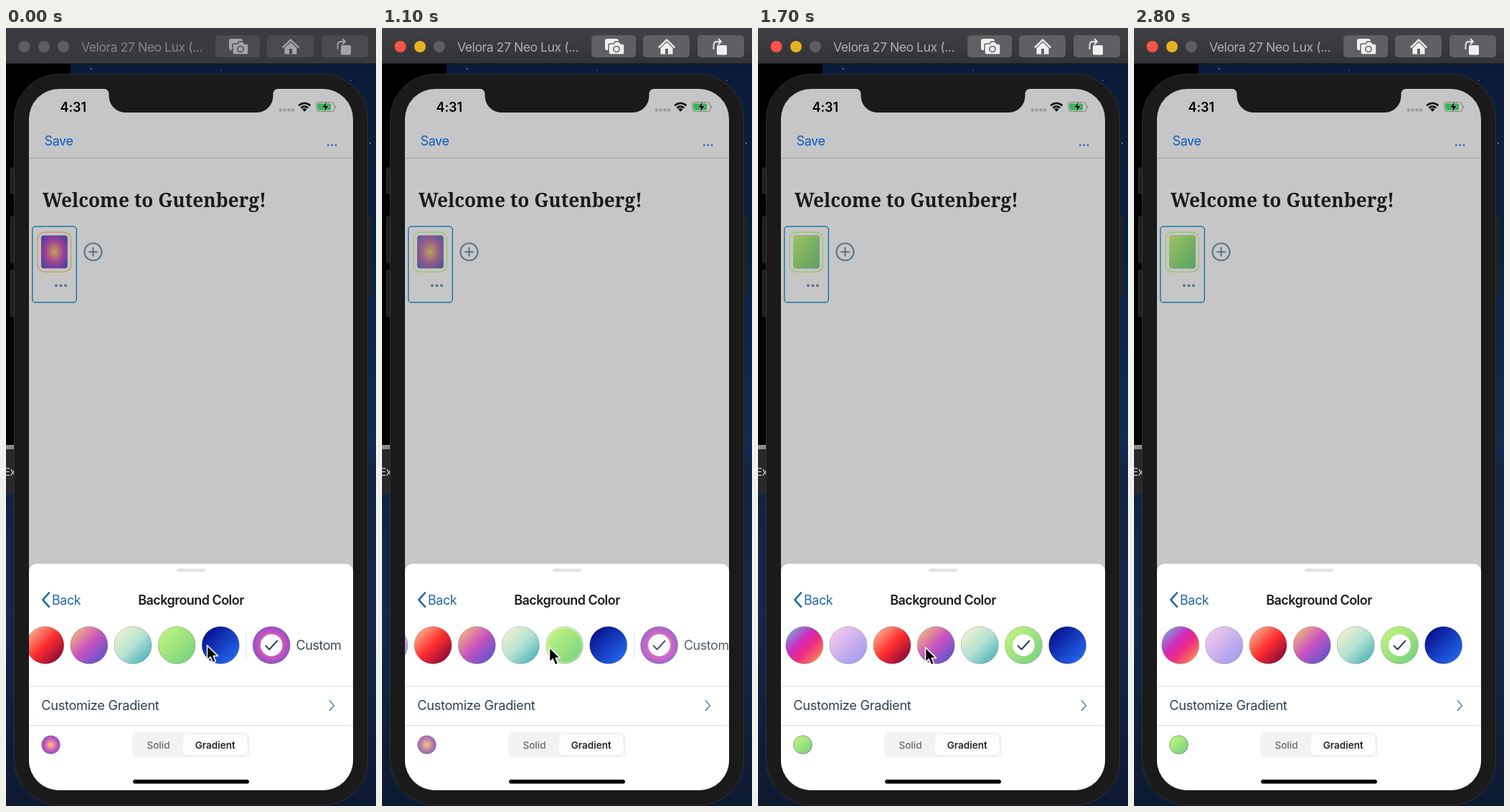
Recreate the animation shown at these times as an HTML page. Size 516 by 1086 pixels, loop 2830 ms.

```html
<!DOCTYPE html>
<html lang="en">
<head>
<meta charset="utf-8">
<title>Background color picker</title>
<style>
html, body { margin: 0; height: 100%; overflow: hidden; background: #0b1a36; }
svg { display: block; width: 100vw; height: 100vh; }
text { font-family: Inter, Roboto, sans-serif; font-size: 18px; letter-spacing: -.45px; white-space: pre; }
.mid { text-anchor: middle; }
.line { fill: none; stroke-linecap: round; stroke-linejoin: round; }
#bar { --top: #3b3c3f; --low: #38393c; --btn: #4a4b4e; --ico: #a3a4a6; --txt: #858688; --red: #5d5e60; --yel: #5d5e60; }
#bar.on { --top: #404145; --low: #323337; --btn: #5f6063; --ico: #f0f0f1; --txt: #adaeb0; --red: #ff5148; --yel: #e6b422; }
#bar .ico { fill: var(--ico); }
#bar .cut { stroke: var(--btn); fill: var(--ico); }
#bar .hole { fill: var(--btn); }
</style>
</head>
<body>
<svg viewBox="0 0 516 1086" preserveAspectRatio="none">
  <defs>
    <linearGradient id="sky" x2="0" y2="1">
      <stop stop-color="#0a1a38"/><stop offset=".3" stop-color="#0b2143"/>
      <stop offset=".54" stop-color="#122b52"/><stop offset=".57" stop-color="#112340"/>
      <stop offset=".75" stop-color="#14284a"/><stop offset="1" stop-color="#0c1a30"/>
    </linearGradient>
    <clipPath id="screen"><rect x="32" y="85" width="452" height="979" rx="42"/></clipPath>
  </defs>

  <!-- desktop -->
  <rect width="516" height="1086" fill="url(#sky)"/>
  <g fill="#6f8fc0"><circle cx="119" cy="57" r="1"/><circle cx="508" cy="161" r="1"/><circle cx="481" cy="73" r=".8"/><circle cx="300" cy="59" r=".7"/></g>
  <rect y="50" width="90" height="535" fill="#000"/>
  <rect y="582" width="12" height="6" fill="#8b8b8c"/>
  <rect y="588" width="12" height="63" fill="#29292b"/>
  <text x="-3" y="625" fill="#d0d0d0" style="font-size:15px">Ex</text>

  <!-- window bar -->
  <g id="bar">
    <linearGradient id="barFill" x2="0" y2="1">
      <stop style="stop-color:var(--top)"/><stop offset="1" style="stop-color:var(--low)"/>
    </linearGradient>
    <rect width="516" height="50" fill="url(#barFill)"/>
    <rect y="49.5" width="516" height="1" fill="#111"/>
    <circle cx="25.5" cy="26" r="8" style="fill:var(--red)"/>
    <circle cx="53" cy="26" r="8" style="fill:var(--yel)"/>
    <circle cx="80" cy="26" r="8" fill="#5d5e60"/>
    <text x="105" y="32.5" style="fill:var(--txt);font-size:17.6px">Velora 27 Neo Lux (...</text>
    <g class="hole">
      <rect x="292" y="10" width="62" height="31" rx="5"/>
      <rect x="364" y="10" width="65" height="31" rx="5"/>
      <rect x="440" y="10" width="65" height="31" rx="5"/>
    </g>
    <rect class="ico" x="311" y="15" width="19" height="16" rx="3"/>
    <path class="cut" stroke-width="1.5" d="M318 22h5l2-3h6l2 3h3q2 0 2 2v11q0 2-2 2h-18q-2 0-2-2V24q0-2 2-2z"/>
    <circle cx="327" cy="29.5" r="4.8" class="hole"/>
    <circle cx="327" cy="29.5" r="3.2" class="ico"/>
    <path class="ico" d="M397 15l12 11.5-1.6 1.7L397 18.3 386.6 28.2 385 26.5z M397 20l8.5 8v8.5h-17V28z"/>
    <rect class="hole" x="395" y="29" width="4" height="7.5"/>
    <rect class="ico" x="467" y="24" width="14" height="13.5" rx="2"/>
    <path class="line" style="stroke:var(--ico)" stroke-width="1.8" d="M462.5 29v-5q0-5 5-5h5M469.5 15.5l3.5 3.5-3.5 3.5"/>
  </g>

  <!-- phone -->
  <g fill="#202022" stroke="#2e2e30" stroke-width=".8">
    <rect x="6" y="195" width="8" height="36" rx="2"/><rect x="6" y="263" width="8" height="65" rx="2"/>
    <rect x="6" y="338" width="8" height="65" rx="2"/><rect x="500" y="263" width="9" height="110" rx="2"/>
  </g>
  <rect x="11.5" y="64.5" width="493" height="1020.5" rx="63" fill="#1a1a1a" stroke="#303032"/>

  <g clip-path="url(#screen)">
    <rect x="32" y="85" width="452" height="979" fill="#c6c6c6"/>
    <path fill="#1a1a1a" d="M137 84v1a6.500 6.500 0 0 1 6.500 6.500v3.500a23 23 0 0 0 23 23h183a23 23 0 0 0 23-23v-3.500a6.500 6.500 0 0 1 6.500-6.500v-1z"/>
    <text x="75.5" y="117" font-weight="600" style="letter-spacing:-.1px">4:31</text>
    <g fill="#98989a"><circle cx="383" cy="114.5" r="2.3"/><circle cx="388.7" cy="114.5" r="2.3"/><circle cx="394.4" cy="114.5" r="2.3"/><circle cx="400" cy="114.5" r="2.3"/></g>
    <path class="line" stroke="#000" stroke-width="2.5" style="stroke-linecap:butt" d="M408.3 108.3a11.5 11.5 0 0 1 16 0M411.3 111.6a7 7 0 0 1 10 0"/>
    <path d="M413 113.3q3.3-2.6 6.6 0l-3.3 3.5z"/>
    <rect x="432.5" y="103.5" width="25.5" height="13" rx="3.8" fill="none" stroke="#7d8580"/>
    <rect x="434.2" y="105.2" width="19" height="9.6" rx="2.3" fill="#33b653"/>
    <path d="M459.2 107.7q2.4 2.3 0 4.6z" fill="#7d8580"/>
    <path d="M447.5 102.5l-7 8.5h4.3l-1.5 6.5 7-8.7h-4.3z" stroke="#c6c6c6" stroke-width=".7"/>

    <text x="53.6" y="164" fill="#075cc4">Save</text>
    <g fill="#075cc4"><circle cx="449.3" cy="163.5" r="1.3"/><circle cx="454.7" cy="163.5" r="1.3"/><circle cx="460" cy="163.5" r="1.3"/></g>
    <rect x="32" y="181" width="452" height="1" fill="#a7a7a8"/>
    <text x="50.7" y="249.5" fill="#1b1b1d" font-weight="700" style="font-family:'Noto Serif',serif;font-size:26.2px;letter-spacing:0">Welcome to Gutenberg!</text>

    <rect x="36.8" y="277" width="61.5" height="106" rx="4" fill="none" stroke="#1b7ba9" stroke-width="1.5"/>
    <rect id="ring" x="44" y="285" width="46.5" height="55.5" rx="10" fill="none" stroke-width="1.3"/>
    <g id="block"></g>
    <g fill="#557085"><circle cx="70" cy="359.5" r="1.9"/><circle cx="76.5" cy="359.5" r="1.9"/><circle cx="83" cy="359.5" r="1.9"/></g>
    <g class="line" stroke="#5a7489" stroke-width="2.1"><circle cx="121.5" cy="312.5" r="12"/><path d="M116 312.5h11M121.5 307v11"/></g>

    <!-- bottom sheet -->
    <rect x="32" y="748" width="452" height="340" rx="11" fill="#fff"/>
    <rect x="238" y="754.8" width="40" height="4.4" rx="2.2" fill="#e3e4e6"/>
    <path class="line" stroke="#1f67a3" stroke-width="2.6" d="M60 788.5l-8.7 9.7 8.7 9.7"/>
    <text x="64" y="804.5" fill="#1f67a3">Back</text>
    <text class="mid" x="258" y="804.5" fill="#1b1b1d" font-weight="600" style="letter-spacing:-.55px">Background Color</text>
    <g id="row"></g>
    <g fill="#dcdcde"><rect x="32" y="918.5" width="452" height="1"/><rect x="32" y="973" width="452" height="1"/></g>
    <text x="49.3" y="952" fill="#2d3f50" style="font-size:18.2px;letter-spacing:-.3px">Customize Gradient</text>
    <path class="line" stroke="#5f8bab" stroke-width="1.7" d="M451.3 939l6 6.8-6 6.8"/>
    <g id="thumb"></g>
    <rect x="176" y="983" width="164" height="35" rx="8" fill="#f2f2f3"/>
    <rect x="247" y="986.5" width="89.5" height="28" rx="7" fill="#fefefe"/>
    <g class="mid" style="font-size:13.5px">
      <text x="212.5" y="1005.5" fill="#66676a" font-weight="500" style="font-size:inherit;letter-spacing:0">Solid</text>
      <text x="291.7" y="1005.5" fill="#222326" font-weight="600" style="font-size:inherit;letter-spacing:0">Gradient</text>
    </g>
    <rect x="177" y="1049.3" width="162" height="5.4" rx="2.7"/>
  </g>

  <path id="cursor" stroke="#fff" stroke-width="1.5" stroke-linejoin="round" d="M0 0V20.5L4.7 16.2 8 24.2 12 22.5 8.7 14.7H15z"/>
</svg>
<script>
const $ = id => document.getElementById(id);

// Colour stops, evenly spaced
const gradients = {
  spectrum: ['#4aeadc', '#9778d1', '#cf2aba', '#ee2c82', '#fb6962', '#fef84c'],
  blush: ['#ffceec', '#9896f0'],
  bordeaux: ['#fecda5', '#fe2d2d', '#6b003e'],
  dusk: ['#ffcb70', '#c751c0', '#4158d0'],
  ocean: ['#fff5cb', '#b6e3d4', '#33a7b5'],
  grass: ['#caf880', '#71ce7e'],
  midnight: ['#020381', '#2874fc']
};
const stops = list => list.map((c, i) => `<stop offset="${i / (list.length - 1)}" stop-color="${c}"/>`).join('');
const names = Object.keys(gradients);
document.querySelector('defs').innerHTML +=
  names.map(n => `<linearGradient id="${n}" x2="1" y2="1">${stops(gradients[n])}</linearGradient>`).join('') +
  `<radialGradient id="custom" r=".7071">${stops(gradients.dusk)}</radialGradient>`;

const disc = (x, y, r, fill, extra = '') =>
  `<circle cx="${x}" cy="${y}" r="${r}" fill="url(#${fill})" stroke="#000" stroke-opacity=".2" ${extra}/>`;
const check = (x, id) => `<g id="${id}" transform="translate(${x} 861.5)">
  <circle r="15.3" fill="#fff"/><path class="line" stroke="#2b3c52" stroke-width="1.9" d="M-8 .8l5 5.2L8-6"/></g>`;

const SCROLL = 132.3, STEP = 61.15, FIRST = 64.7;
const swatchX = i => FIRST + STEP * i - SCROLL;
$('row').innerHTML =
  names.map((n, i) => disc(swatchX(i), 861.5, 26, n)).join('') +
  `<circle id="glow" cx="${swatchX(5)}" cy="861.5" r="25" fill="none" stroke="#fff" stroke-width="3"/>` +
  check(swatchX(5), 'grassCheck') +
  `<g id="customItem"><rect x="334.5" y="841" width="1" height="41" fill="#e4e5e7"/>
  ${disc(370.2, 861.5, 26, 'custom')}${check(370.2, 'customCheck')}
  <text x="404.5" y="868" fill="#3b4854">Custom</text></g>`;

const tile = (fill, id) => `<rect id="${id}" x="49" y="289.5" width="36.8" height="46" rx="4" fill="url(#${fill})"/>`;
$('block').innerHTML = tile('custom', 'oldTile') + tile('grass', 'newTile') +
  '<rect x="49" y="289.5" width="36.8" height="46" rx="4" fill-opacity=".22"/>';
$('thumb').innerHTML = disc(62.5, 1000.5, 12.8, 'custom') + disc(62.5, 1000.5, 12.8, 'grass', 'id="newThumb"');

const LOOP = 2830;
const ease = p => (1 - Math.cos(Math.PI * Math.min(1, Math.max(0, p)))) / 2;
const fade = (id, opacity) => $(id).setAttribute('opacity', opacity);

// Pointer stops: time, x, y
const path = [[0, 280, 861], [60, 280, 861], [560, 231, 865], [760, 231, 865], [1000, 233, 864], [1720, 233, 864]];
function pointer(t) {
  if (t > 1720) {
    const p = (t - 1720) / 280;
    return [233 - 13 * p, 864 - 320 * p ** 2.2];
  }
  const i = path.findIndex(k => k[0] >= t) || 1;
  const [a, b] = [path[i - 1], path[i]];
  const p = ease((t - a[0]) / (b[0] - a[0]));
  return [a[1] + (b[1] - a[1]) * p, a[2] + (b[2] - a[2]) * p];
}

function draw(t) {
  const k = ease((t - 1030) / 310);
  const mix = 1 - (1 - k) ** 2;
  $('bar').setAttribute('class', t >= 930 ? 'on' : '');
  $('row').setAttribute('transform', `translate(${SCROLL * k} 0)`);
  fade('customItem', 1 - k);
  fade('newTile', mix);
  fade('newThumb', mix);
  fade('grassCheck', ease((t - 1090) / 210));
  fade('glow', 2.8 * k * (1 - k));
  $('ring').setAttribute('stroke', t >= 1060 ? '#9fc46a' : '#c6a05c');
  const [x, y] = pointer(t);
  $('cursor').setAttribute('transform', `translate(${x + .5} ${y + .7})`);
}

function tick() {
  draw(performance.now() % LOOP);
  requestAnimationFrame(tick);
}
tick();
</script>
</body>
</html>
```
